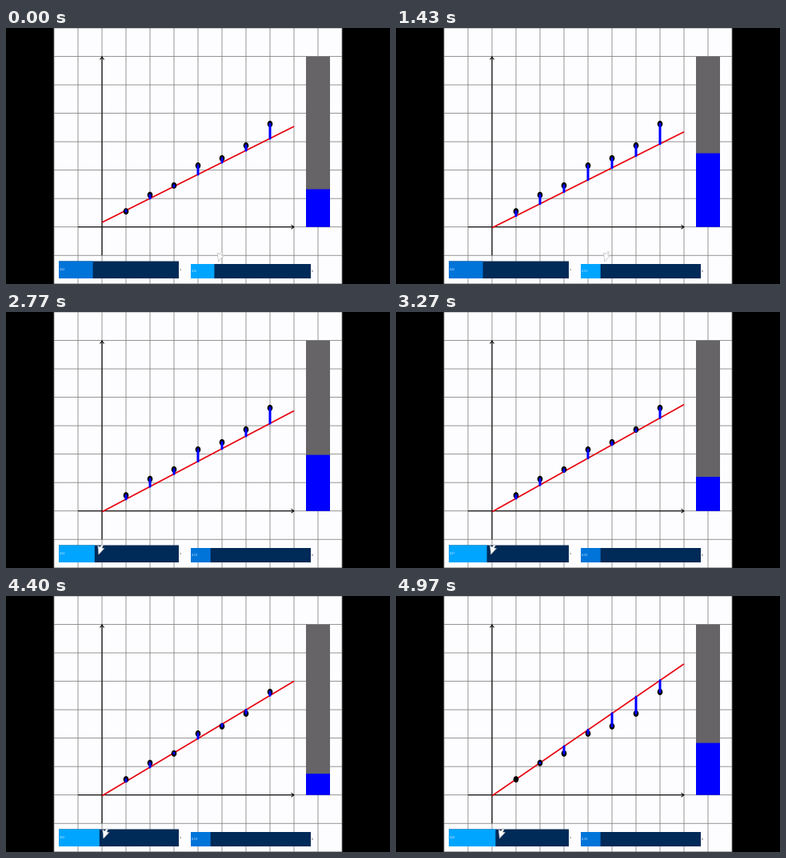
A matplotlib script for the animation above (5 s loop, 480 by 320 pixels).

```python
import numpy as np
import matplotlib.pyplot as plt
from matplotlib.animation import FuncAnimation
from matplotlib.patches import Ellipse, Polygon, Rectangle

W, H, DPI = 480, 320, 100
PX = 72 / DPI
FRAMES, STEP = 125, 40

UX, UY = 30, 35.53                 # one chart unit in pixels
X0, Y0 = 120, 7 * UY               # chart origin in pixels
XS = np.arange(1, 8)
YS = np.array([0.55, 1.125, 1.46, 2.16, 2.415, 2.865, 3.625])

NAVY, MID, BRIGHT = "#002a57", "#0074d9", "#00a5ff"
BLUE, RED, GRID = "#0000ff", "#e6000f", "#7c7c7c"

# Times in ms: cursor leaves one slider, reaches the other, then drags it
LEAVE, SWITCH, ARRIVE, GRAB, PUSH, STOP = 1400, 1680, 1900, 2450, 4600, 4960


def ramp(t, start, end):
    return min(1, max(0, (t - start) / (end - start)))


def ease_out(u):
    return 1 - (1 - u) ** 2


def smooth(u):
    return u * u * (3 - 2 * u)


def slope(t):
    return (0.422 + 0.083 * ease_out(ramp(t, GRAB, PUSH))
            + 0.075 * ramp(t, PUSH, STOP))


def offset(t):
    return (0.16 - 0.015 * ramp(t, 0, 280) - 0.1 * ramp(t, 860, 920)
            - 0.075 * ramp(t, 920, 1370))


def px(x, y):
    return X0 + UX * x, Y0 - UY * y


plt.rcParams["path.snap"] = False
fig = plt.figure(figsize=(W / DPI, H / DPI), dpi=DPI, facecolor="black")
ax = fig.add_axes([0, 0, 1, 1])
ax.set_xlim(0, W)
ax.set_ylim(H, 0)
ax.axis("off")


def rect(x, y, w, h, color, z=1):
    return ax.add_patch(Rectangle((x, y), w, h, fc=color, ec="none", lw=0, zorder=z))


def line(xs, ys, color, width, z, cap="butt"):
    return ax.plot(xs, ys, color=color, lw=width * PX, zorder=z,
                   solid_capstyle=cap)[0]


# Paper and grid
rect(60, 0, 360, H, "#fdfdff", 0)
for x in range(60, 421, 30):
    line([x, x], [0, H], GRID, 0.8, 1)
for k in range(10):
    line([60, 420], [k * UY] * 2, GRID, 0.8, 1)

# Axes with open arrowheads
line([X0, X0], [8 * UY, UY], "black", 1.1, 2)
line([90, 360], [Y0, Y0], "black", 1.1, 2)
line([X0 - 2.5, X0, X0 + 2.5], [UY + 4, UY + 0.5, UY + 4], "black", 1, 2)
line([356.5, 360, 356.5], [Y0 - 2.5, Y0, Y0 + 2.5], "black", 1, 2)

# Fitted line, points and residuals
fit = line([], [], RED, 1.7, 4)
residuals = []
for x, y in zip(XS, YS):
    ax.add_patch(Ellipse(px(x, y), 6.6, 8, fc="black", ec="none", zorder=5))
    residuals.append(line([], [], BLUE, 3, 6, "round"))

# Error gauge
rect(375, UY, 30, Y0 - UY, "#666466", 3)
gauge = rect(375, Y0, 30, 0, BLUE, 4)


class Slider:
    def __init__(self, x, y, h, name):
        self.x = x
        rect(x, y, 150, h, NAVY, 3)
        self.fill = rect(x, y, 0, h, MID, 4)
        style = dict(fontsize=3.2 * PX, va="center", family="DejaVu Sans", zorder=5)
        self.label = ax.text(x + 0.5, y + h / 2, "", color="#cfe8ff", **style)
        ax.text(x + 151, y + h / 2, name, color="#555555", **style)

    def set(self, fraction, value, active):
        self.fill.set_width(150 * fraction + 0.4)
        self.fill.set_facecolor(BRIGHT if active else MID)
        self.label.set_text(f"{value:.2f}")

    def handle(self):
        return self.x + self.fill.get_width() + 5


slope_slider = Slider(66, 291.5, 21.5, "a")
offset_slider = Slider(231, 295, 18, "b")

ARROW = np.array([(0, 0), (-1, -11), (1.5, -9), (4.5, -12.5), (5.8, -11.7),
                  (4, -8), (7, -7.5)])
cursor = ax.add_patch(Polygon(ARROW, closed=True, fc="white", ec="#b4b4b4",
                              lw=0.6 * PX, zorder=9))


def tip(t):
    """Follow one handle, swing over in an arc, then follow the other."""
    start, end = offset_slider.handle(), slope_slider.handle()
    swing = ramp(t, LEAVE, ARRIVE)
    near = end + 18 * (1 - ramp(t, ARRIVE, GRAB))
    x = start + (near - start) * smooth(swing)
    y = 292 - 26 * np.sin(np.pi * swing) + 11 * ramp(t, ARRIVE, GRAB)
    return x, y


def draw(i):
    t = i * STEP
    a, b = slope(t), offset(t)
    slope_slider.set(a / 1.5, a, t >= SWITCH)
    offset_slider.set((b + 1) / 6, b, t < SWITCH)

    fit.set_data(*px(np.array([0, 8]), np.array([b, 8 * a + b])))
    guess = a * XS + b
    for bar, x, y, g in zip(residuals, XS, YS, guess):
        bar.set_data(*px(np.array([x, x]), np.array([y, g])))

    error = UY * np.abs(YS - guess).sum()
    gauge.set_y(Y0 - error)
    gauge.set_height(error)
    cursor.set_xy(ARROW + tip(t))
    return []


anim = FuncAnimation(fig, draw, frames=FRAMES, interval=STEP, repeat=True,
                     repeat_delay=0, blit=False)
plt.show()
```
